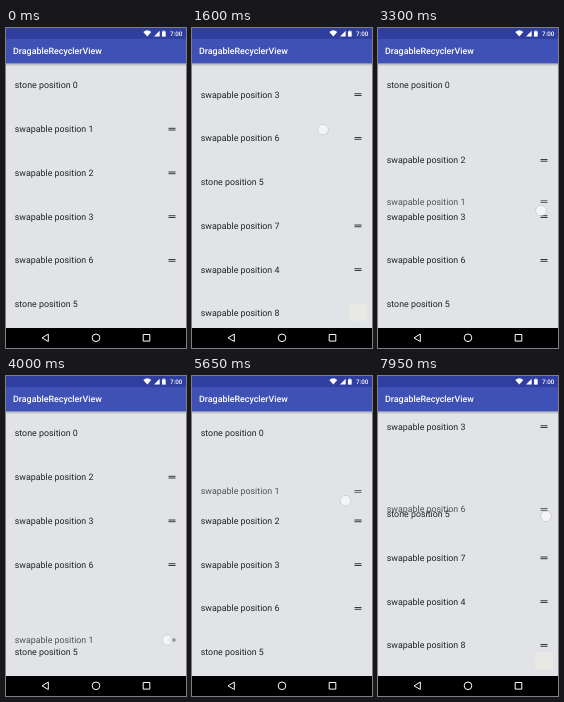
Animation, 180 px wide and 320 px high, one loop 8000 ms. Source, as an HTML page with a canvas:

```html
<!DOCTYPE html>
<html lang="en">
<head>
<meta charset="utf-8">
<title>Draggable list</title>
<style>
html, body { margin: 0; width: 100%; height: 100%; overflow: hidden; background: #000; }
canvas { display: block; width: 180px; height: 320px; }
</style>
</head>
<body>
<canvas id="stage"></canvas>
<script>
const W = 180, H = 320, LOOP = 8000, STEP = 50;
const TOP = 35.5, BOTTOM = 300, ROW = 43.75;
const LAG = 28, SETTLE = 250, SWIPE = 800;
const INK = '#222326';

const canvas = document.getElementById('stage');
const ctx = canvas.getContext('2d');
const dpr = window.devicePixelRatio || 1;
canvas.width = W * dpr;
canvas.height = H * dpr;

// Row numbers in list order; stones cannot be moved.
const order = [0, 1, 2, 3, 6, 5, 7, 4, 8];
const isStone = id => id === 0 || id === 5;

// Each leg of a drag: start, end, finger height reached.
const drags = [
  {
    id: 1, down: 2800, up: 6000, x: 163, sway: 9.5,
    legs: [[2900, 3700, 264], [4050, 4250, 250], [4300, 4990, 45], [5000, 5250, 37], [5300, 5850, 161]]
  },
  { id: 6, down: 7500, up: LOOP, x: 168, sway: 0, legs: [[7680, 8150, 169]] }
];

// Eased 0 to 1 between two times.
function ramp(t, from, to) {
  const u = Math.max(0, Math.min(1, (t - from) / (to - from)));
  return (1 - Math.cos(Math.PI * u)) / 2;
}

// Quick start with a long slow end.
function fling(t, start) {
  const u = Math.max(0, Math.min(1, (t - start) / SWIPE));
  return 1 - Math.pow(1 - Math.pow(u, 1.5), 3.75);
}

function scrollAt(t) {
  return 122 * (fling(t, 800) - ramp(t, 1650, 2160)) + 138 * fling(t, 6400);
}

const slotY = (slot, scroll) => TOP + ROW * (slot + 0.5) - scroll;

function fingerY(drag, t) {
  return drag.legs.reduce((y, [from, to, goal]) => y + (goal - y) * ramp(t, from, to), drag.home);
}

// Follow each drag and note when a passed neighbour gives up its slot.
function findMoves() {
  const list = [...order], moves = [];
  for (const drag of drags) {
    const scroll = scrollAt(drag.down);
    let slot = list.indexOf(drag.id);
    drag.home = slotY(slot, scroll);
    for (let at = drag.down; at < drag.up; at += 5) {
      const y = fingerY(drag, at - LAG);
      for (const dir of [-1, 1]) {
        const id = list[slot + dir];
        const passed = (y - slotY(slot + dir, scroll)) * dir >= 0;
        if (!passed || isStone(id)) continue;
        moves.push({ id, at, to: slot });
        list[slot] = id;
        slot += dir;
        list[slot] = drag.id;
      }
    }
    drag.slot = slot;
    moves.push({ id: drag.id, at: drag.up, to: slot });
  }
  return moves;
}

const moves = findMoves();

function slotOf(id, t) {
  return moves.filter(m => m.id === id).reduce(
    (slot, m) => slot + (m.to - slot) * ramp(t, m.at, m.at + SETTLE),
    order.indexOf(id));
}

function rowState(id, t, scroll) {
  const drag = drags.find(d => d.id === id);
  if (!drag || t < drag.down || t >= drag.up + SETTLE) {
    return { id, y: slotY(slotOf(id, t), scroll), alpha: 1, lifted: false };
  }
  const back = ramp(t, drag.up, drag.up + SETTLE);
  const held = fingerY(drag, t - LAG);
  return {
    id,
    y: held + (slotY(drag.slot, scroll) - held) * back,
    alpha: 0.75 + 0.25 * back,
    lifted: true
  };
}

function touchAt(t, scroll) {
  const drag = drags.find(d => t >= d.down && t < d.up);
  if (drag) return [drag.x - drag.sway * ramp(t, 3700, 4800), fingerY(drag, t)];
  const swiping = (t >= 800 && t < 2050) || (t >= 6400 && t < 6750);
  return swiping ? [131, 227 - scroll - Math.min(scroll, 3.5)] : null;
}

function rect(x, y, w, h, color) {
  ctx.fillStyle = color;
  ctx.fillRect(x, y, w, h);
}

function label(text, x, y, size, color, weight = 400) {
  ctx.font = `${weight} ${size}px Roboto, sans-serif`;
  ctx.textRendering = 'geometricPrecision';
  ctx.fillStyle = color;
  ctx.fillText(text, x, y);
}

function polygon(...points) {
  ctx.beginPath();
  points.forEach(([x, y]) => ctx.lineTo(x, y));
  ctx.closePath();
}

function circle(x, y, r) {
  ctx.beginPath();
  ctx.arc(x, y, r, 0, 2 * Math.PI);
}

function drawRow({ id, y, alpha }) {
  ctx.globalAlpha = alpha;
  label(`${isStone(id) ? 'stone' : 'swapable'} position ${id}`, 8.75, y + 3, 8.85, INK);
  if (!isStone(id)) {
    rect(162.5, y - 1.31, 7, 0.88, INK);
    rect(162.5, y + 0.44, 7, 0.88, INK);
  }
  ctx.globalAlpha = 1;
}

function drawGlow(t) {
  const amount = ramp(t, 2130, 2250) - ramp(t, 2400, 2850);
  const ry = 270 * amount;
  ctx.fillStyle = `rgba(63, 81, 181, ${0.27 * amount})`;
  ctx.beginPath();
  ctx.ellipse(W / 2, TOP + 31 * amount - ry, 270, ry, 0, 0, 2 * Math.PI);
  ctx.fill();
}

function drawList(t, scroll) {
  rect(0, TOP, W, BOTTOM - TOP, '#e1e3e7');
  ctx.save();
  ctx.beginPath();
  ctx.rect(0, TOP, W, BOTTOM - TOP);
  ctx.clip();
  order.map(id => rowState(id, t, scroll))
    .sort((a, b) => a.lifted - b.lifted)
    .forEach(drawRow);
  if (scroll > 118) rect(157, 276, 18, 17, '#e8e8e5');
  drawGlow(t);
  const shade = ctx.createLinearGradient(0, TOP, 0, TOP + 3);
  shade.addColorStop(0, 'rgba(0, 0, 0, 0.22)');
  shade.addColorStop(1, 'rgba(0, 0, 0, 0)');
  rect(0, TOP, W, 3, shade);
  ctx.restore();
}

function drawStatus() {
  rect(0, 0, W, 11, '#303f9f');
  ctx.fillStyle = '#fff';
  ctx.beginPath();
  ctx.moveTo(141.3, 8.5);
  ctx.arc(141.3, 8.5, 6, -Math.PI * 0.73, -Math.PI * 0.27);
  ctx.fill();
  polygon([148, 8.5], [153.7, 8.5], [153.7, 2.8]);
  ctx.fill();
  rect(156, 3.3, 3.7, 5.3, '#fff');
  rect(157, 2.6, 1.7, 0.7, '#fff');
  label('7:00', 164, 8, 6.25, '#fff', 500);
}

function drawNav() {
  const y = 309.8;
  rect(0, BOTTOM, W, H - BOTTOM, '#000');
  ctx.strokeStyle = '#fff';
  ctx.lineWidth = 1;
  ctx.lineJoin = 'round';
  polygon([36, y], [42.3, y - 3.7], [42.3, y + 3.7]);
  ctx.stroke();
  circle(90, y, 3.8);
  ctx.stroke();
  ctx.strokeRect(137.2, y - 3.3, 6.6, 6.6);
}

function drawTouch(point) {
  if (!point) return;
  circle(...point, 5.3);
  ctx.fillStyle = 'rgba(248, 248, 248, 0.8)';
  ctx.fill();
  ctx.strokeStyle = 'rgba(150, 150, 155, 0.5)';
  ctx.lineWidth = 0.6;
  ctx.stroke();
}

function draw(now) {
  const t = Math.floor((now % LOOP) / STEP) * STEP;
  const scroll = scrollAt(t);
  ctx.setTransform(dpr, 0, 0, dpr, 0, 0);
  rect(0, 0, W, TOP + 0.5, '#3f51b5');
  drawList(t, scroll);
  drawStatus();
  label('DragableRecyclerView', 7, 26, 8.9, '#fff', 500);
  drawNav();
  drawTouch(touchAt(t, scroll));
}

let start = null;
function tick(now) {
  if (start === null) start = now;
  draw(now - start);
  requestAnimationFrame(tick);
}
draw(0);
requestAnimationFrame(tick);
</script>
</body>
</html>
```
